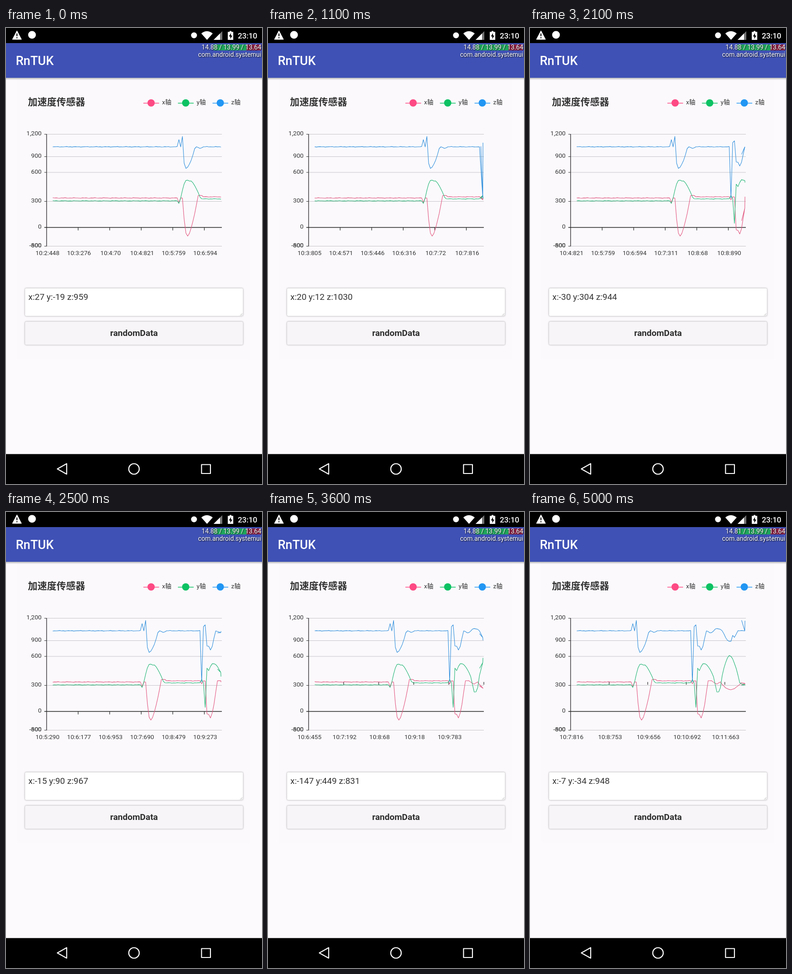
Animation of 561x998 px, one loop 5100 ms. Source, as an HTML page:

```html
<!DOCTYPE html>
<html lang="zh">
<head>
<meta charset="utf-8">
<title>Sensor chart</title>
<style>
html, body { margin: 0; width: 100%; height: 100%; overflow: hidden; background: #fbf9fc; }
svg { display: block; width: 561px; height: 998px; font-family: Roboto, "Noto Sans CJK SC", sans-serif; }
.label { font-size: 13.6px; fill: #333; }
.end { text-anchor: end; }
.mid { text-anchor: middle; }
.hud { font-size: 14px; fill: #fff; text-anchor: end; filter: drop-shadow(1px 1px 1px #000); }
.box { filter: drop-shadow(0 0 1.5px rgba(0, 0, 0, .25)); stroke: #dcdadd; }
.line { fill: none; stroke-width: 1.1; stroke-linejoin: round; }
</style>
</head>
<body>
<svg viewBox="0 0 561 998">
  <defs>
    <linearGradient id="shade" x2="0" y2="1">
      <stop stop-color="#000" stop-opacity=".27"/>
      <stop offset="1" stop-color="#000" stop-opacity="0"/>
    </linearGradient>
  </defs>
  <rect width="561" height="998" fill="#fcfafd"/>
  <rect x="25" y="112" width="510" height="613" fill="#fbf9fc"/>

  <!-- status bar -->
  <rect width="561" height="33"/>
  <g fill="#fff">
    <path d="M24 6 34 25H14Z" stroke="#fff" stroke-linejoin="round"/>
    <path d="M23 12h2v6h-2zM23 20h2v2.5h-2z" fill="#000"/>
    <circle cx="57" cy="15" r="8.5"/>
    <circle cx="412" cy="16" r="6.5"/>
    <path d="M428 12Q440 2 453 12L440.5 26Z"/>
    <path d="M474 7V26H455Z" opacity=".45"/>
    <path d="M469 12V26H455Z"/>
    <path d="M486 8.5h4v-2h4v2h4V26h-12z"/>
    <path d="M493 11 488.500 18.5h3V24l4.500-7.500h-3z" fill="#000"/>
    <text x="508" y="22.5" font-size="16.8" font-weight="500">23:10</text>
  </g>

  <!-- app bar -->
  <rect y="33" width="561" height="76" fill="#3f51b5"/>
  <rect y="109" width="561" height="5" fill="url(#shade)"/>
  <text x="21.5" y="81" font-size="27" font-weight="500" fill="#fff">RnTUK</text>
  <rect x="455" y="36" width="73" height="13" fill="#1fa65c"/>
  <rect x="527" y="36" width="32" height="13" fill="#8f2346"/>
  <text id="load" class="hud" x="559.5" y="47"></text>
  <text class="hud" x="559.5" y="62.5">com.android.systemui</text>

  <!-- chart -->
  <text x="48" y="168.5" font-size="20.9" font-weight="700" fill="#333">加速度传感器</text>
  <g id="legend"></g>
  <g id="grid"></g>
  <g id="axis"></g>
  <g id="lines"></g>

  <!-- form -->
  <rect class="box" x="41.5" y="569.5" width="478" height="61" rx="3" fill="#fff"/>
  <path d="M513 629.5l5-5M516 629.5l2-2" stroke="#999" stroke-width=".8"/>
  <text id="reading" x="49" y="595" font-size="19" fill="#333"></text>
  <rect class="box" x="41.5" y="642.5" width="478" height="51" rx="3" fill="#f7f5f8"/>
  <text class="mid" x="280.5" y="674" font-size="19" font-weight="700" fill="#2e2e2e">randomData</text>

  <!-- navigation bar -->
  <rect y="932.5" width="561" height="65.5"/>
  <g fill="none" stroke="#fff" stroke-width="2.2" stroke-linejoin="round">
    <path d="M112.5 965 133 953.5V976.5Z"/>
    <circle cx="280.5" cy="965" r="11.5"/>
    <rect x="428.5" y="955.5" width="19.5" height="19.5"/>
  </g>
</svg>

<script>
const LOOP = 5100, LEFT = 89, RIGHT = 473, COUNT = 100;
const BAND = (RIGHT - LEFT) / COUNT;
const $ = id => document.getElementById(id);

// redraw times; a step 100 ms after another only moves the newest samples
const UPDATES = [0, 200, 400, 600, 800, 1000, 1100, 1400, 1600, 1800, 1900, 2100, 2300,
  2500, 2800, 3000, 3300, 3400, 3600, 3800, 3900, 4200, 4300, 4600, 4700, 5000];

// time, samples scrolled, sensor x, y, z
const KEYS = [
  [0, 0, 27, -19, 959],
  [1000, 10, 20, 12, 1030],
  [2100, 18, -30, 304, 944],
  [3000, 24, 4, -178, 995],
  [3600, 29, -147, 449, 831],
  [4200, 34, -116, 199, 936],
  [5000, 40, -7, -34, 948]
];

// axis clock in ms, one key per 18 labels
const CLOCK = [2448, 3276, 4070, 4821, 5759, 6594, 7311, 8068, 8890, 9656, 10420, 11236, 12090];

// each bump: centre sample, rise, fall, height in px (positive is down)
const SERIES = [
  { name: 'x轴', color: '#fd4a84', ink: '#e2557f', rest: [372, 369.5], bumps: [
    [75, 1, 1, 9], [79.6, 2.6, 6.2, 84], [87, 2, 2, -4], [109, 1, 1, 6], [112, 1, 1, 28],
    [113.7, 2.7, 4.1, 82], [123, 2.5, 2, 7], [130.5, 6, 7.5, 19.5], [138, 1, 1, 8], [140, 2, 1, 8]] },
  { name: 'y轴', color: '#0cc263', ink: '#1eb573', rest: [378.3, 374], bumps: [
    [75, 1, 1, 5], [79.5, 3.8, 8, -46], [109, 1, 1, -8], [111, 1, 1, 53], [112, 1, 1, -18],
    [115.5, 4.4, 7, -43], [123.5, 2, 2.2, 22], [130.3, 5.2, 5.7, -60], [138, 1.5, 3, 5]] },
  { name: 'z轴', color: '#2196f3', ink: '#2f8fdc', rest: [260, 260], bumps: [
    [75, 1, 1, -16], [77, 1, 1, -23], [78.8, 1.8, 5.5, 48], [87, 2, 2, 3], [109, 1, 1, 112],
    [110.8, 1.5, 1.2, -14], [112, 1, 1, 14], [114.1, 3, 2.5, 42], [119.5, 2, 2, 5],
    [123, 2.5, 3, -5], [130.3, 4, 4.5, 24], [132, 1, 1, -9], [138, 1, 1, -23], [140, 1, 1, -22]] }
];

const text = (x, y, cls, s) => `<text class="${cls}" x="${x}" y="${y}">${s}</text>`;
const stroke = (d, color, width = 1) => `<path d="${d}" stroke="${color}" stroke-width="${width}"/>`;
const slotX = i => LEFT + (i + .5) * BAND;
const mix = (a, b, f) => a + (b - a) * f;

function bump(n, [centre, rise, fall, height]) {
  const u = Math.abs(n - centre) / (n < centre ? rise : fall);
  return u < 1 ? height * (1 - u ** 1.7) : 0;
}

function level(s, n) {
  const wobble = .7 * Math.sin(n * 2.4) * Math.sin(n * 1.3 + s.rest[0]);
  return s.bumps.reduce((y, b) => y + bump(n, b), s.rest[n < 82 ? 0 : 1] + wobble);
}

// scroll and reading at time t, rounded to whole numbers
function stateAt(t) {
  const j = Math.max(1, KEYS.findIndex(k => k[0] >= t));
  const a = KEYS[j - 1], b = KEYS[j];
  const f = (t - a[0]) / (b[0] - a[0]);
  return a.map((v, i) => Math.round(mix(v, b[i], f))).slice(1);
}

function clock(label) {
  const k = Math.floor(label / 3) / 6, i = Math.floor(k);
  const ms = Math.round(mix(CLOCK[i], CLOCK[i + 1], k - i));
  return `10:${Math.floor(ms / 1000)}:${ms % 1000}`;
}

function linePath(s, shift, settling) {
  const pts = [];
  const add = (i, value) => pts.push(slotX(i).toFixed(1) + ' ' + level(s, shift + value).toFixed(1));
  const last = shift ? 97 : 99;
  for (let i = 3; i <= last; i++) add(i, i);
  // newly added samples double back while they slide in
  if (shift) {
    add(98.9, 99);
    add(settling ? 97.8 : 97.1, 98);
    add(98.9, 99);
    add(99, 100);
  }
  return 'M' + pts.join('L');
}

function axisMarkup(shift) {
  const gap = shift < 26 ? 18 : shift < 33 ? 20 : 22;
  const tickY = gap === 18 ? 437 : 372;
  let out = '';
  for (let i = 0; i <= COUNT; i += gap) {
    if (i < COUNT) out += text(slotX(i), 497, 'label mid', clock(shift * 3 + i));
    if (i) out += stroke(`M${LEFT + i * BAND} ${tickY}v6`, '#333', 1.3);
  }
  return out;
}

$('legend').innerHTML = SERIES.map((s, i) => {
  const x = 318 + i * 75.8;
  return stroke(`M${x - 17} 164.5h34.5`, s.color, 1.5) +
    `<circle cx="${x}" cy="164" r="8" fill="${s.color}"/>` + text(x + 24, 167, 'label', s.name);
}).join('');

const ROWS = [['1,200', 232.5], ['900', 281.5], ['600', 316], ['300', 379.5],
  ['0', 436.5], ['-300', 477.5], ['-600', 477.5]];
$('grid').innerHTML = ROWS.map(([s, y]) =>
  stroke(`M${LEFT} ${y}H${RIGHT}`, '#c6c4c8') + stroke(`M84 ${y}H${LEFT}`, '#333') +
  text(78, y + 2.7, 'label end', s)).join('') +
  stroke(`M${LEFT} 232V478`, '#333', 1.4) + stroke(`M84 436.5H${RIGHT}`, '#222', 1.5);

$('lines').innerHTML = SERIES.map(s => `<path class="line" stroke="${s.ink}"/>`).join('');
const paths = [...$('lines').children];

let shown = -1;
function draw(t) {
  const step = UPDATES.findLastIndex(u => u <= t);
  if (step === shown) return;
  shown = step;
  const time = UPDATES[step], before = UPDATES[step - 1];
  const settling = time - before === 100;
  const [shift, x, y, z] = stateAt(settling ? before : time);
  SERIES.forEach((s, i) => paths[i].setAttribute('d', linePath(s, shift, settling)));
  $('axis').innerHTML = axisMarkup(shift);
  $('reading').textContent = `x:${x} y:${y} z:${z}`;
  $('load').textContent = `${time < 4300 ? '14.88' : '14.81'} / 13.99 / 13.64`;
}

const start = performance.now();
function tick() {
  draw((performance.now() - start) % LOOP);
  requestAnimationFrame(tick);
}
tick();
</script>
</body>
</html>
```
